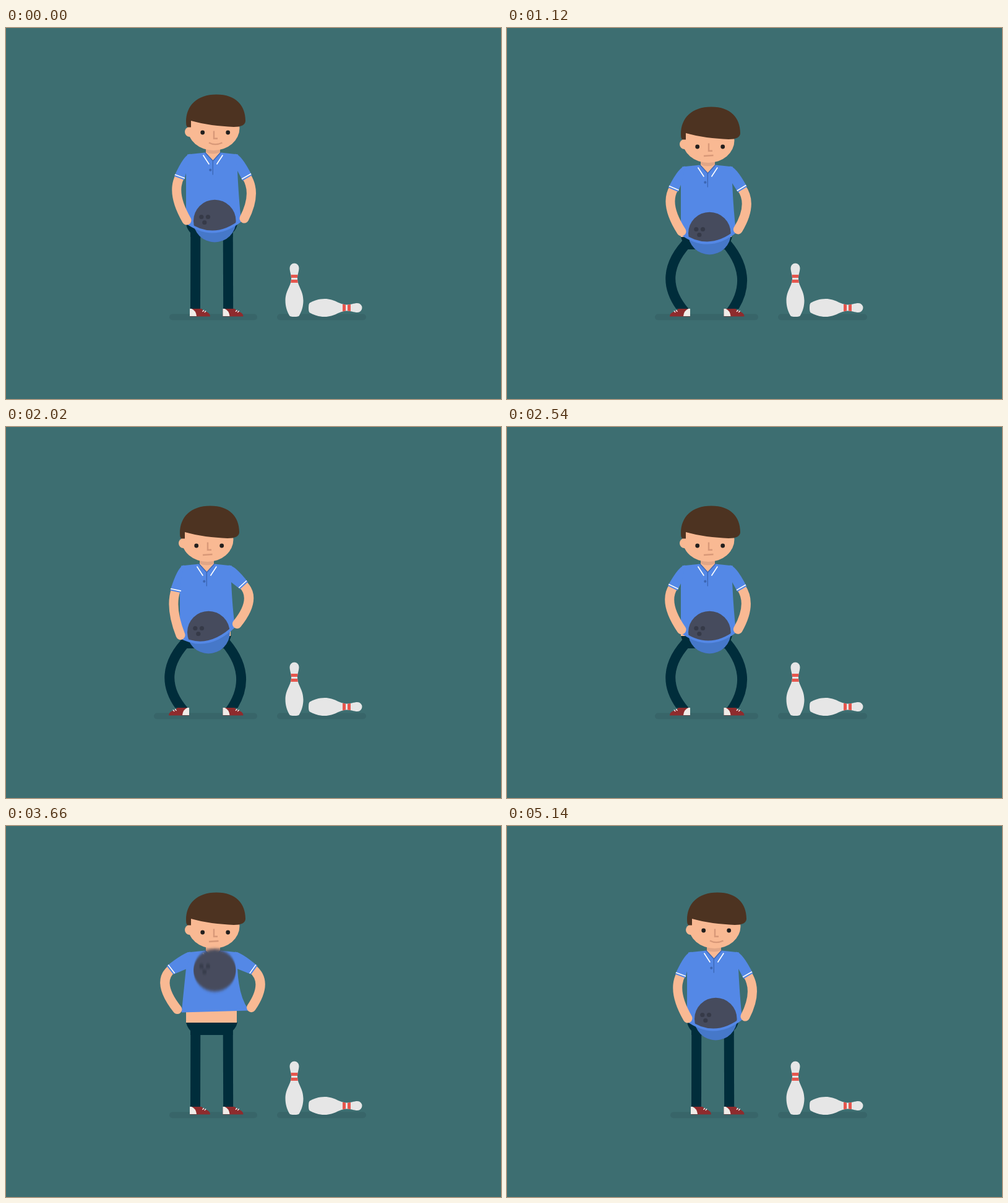
An HTML page for the animation above (6.2 s loop, 800 by 600 pixels).

```html
<!DOCTYPE html>
<html lang="en">
<head>
<meta charset="utf-8">
<title>Bowler</title>
<style>
  html, body { margin: 0; width: 100%; height: 100%; overflow: hidden; background: #3d6e71; }
  svg { display: block; width: 800px; height: 600px; }
  .skin { fill: #f9b993; }
  .shirt { fill: #5488e6; }
  .pants { fill: #002d3b; }
  .leg { fill: none; stroke: #002d3b; stroke-width: 16; }
  .arm { fill: none; stroke: #f9b993; stroke-width: 15; stroke-linecap: round; }
  .feature { fill: none; stroke: #d89878; stroke-width: 2.4; }
  .white { fill: none; stroke: #fff; stroke-width: 1.6; }
  .seam { fill: none; stroke: #3c66b4; stroke-width: 1.3; }
  .shadow { fill: #386569; }
</style>
</head>
<body>
<svg viewBox="0 0 800 600">
  <defs>
    <path id="pinShape" d="M458 465C454 458 451.5 450 451.5 441C451.5 424 461 418 461 405C461 398 458.5 394 458.5 388A7.5 7.5 0 0 1 473.5 388C473.5 394 471 398 471 405C471 418 480.5 424 480.5 441C480.5 450 478 458 474 465Q473 467 466 467Q459 467 458 465Z"/>
    <clipPath id="pinClip"><use href="#pinShape"/></clipPath>
    <g id="pin">
      <use href="#pinShape" fill="#e6e6e6"/>
      <path d="M450 399h32v5h-32zM450 407h32v5h-32z" fill="#e6564d" clip-path="url(#pinClip)"/>
    </g>
    <g id="shoe">
      <path d="M0 0H19C23 5 33 5 33 12.5H0Z" fill="#8e2b2d"/>
      <path d="M0 0H3Q10 3 11 12H0Z" fill="#f0ece8"/>
      <path d="M20.5 4.8l2.4-2.6M23.8 6l2.3-2.6" stroke="#fff" stroke-width="1.3"/>
    </g>
    <clipPath id="legClip"><rect x="200" y="300" width="250" height="154.5"/></clipPath>
    <clipPath id="pouchClip"><path id="pouchArea"/></clipPath>
    <filter id="blur" x="-20%" y="-30%" width="140%" height="160%"><feGaussianBlur id="blurAmount" stdDeviation="0 0"/></filter>
  </defs>

  <rect class="shadow" id="floor" y="462.5" height="10" rx="5"/>
  <rect class="shadow" x="438" y="462.5" width="144" height="10" rx="5"/>
  <use href="#pin"/>
  <use href="#pin" transform="translate(489 452.5) rotate(90) translate(-466 -467)"/>

  <g clip-path="url(#legClip)">
    <path class="leg" id="legL"/>
    <path class="leg" id="legR"/>
  </g>
  <use href="#shoe" id="shoeL"/>
  <use href="#shoe" transform="translate(350.5 454)"/>

  <g id="body">
    <path class="pants" d="M291 317.5H374Q372 326 366.5 331V338H298V331Q293 326 291 317.5Z"/>
    <rect class="skin" x="291" y="290" width="82" height="28"/>
    <path class="shirt" id="torso"/>
    <path class="skin" d="M323 188H346V202L334.5 214.5L323 202Z"/>
    <path d="M323 188H346V201Q334 206 323 201Z" fill="#e2a686"/>
    <path class="seam" d="M321.5 201L334.5 215L347 201M334.3 214V237.5"/>
    <circle cx="330.3" cy="229.7" r="2.1" fill="#3c66b4"/>
    <path class="white" d="M318.5 205.5L328.3 220.5M350.3 205.5L340.5 220.5"/>

    <circle class="skin" cx="297" cy="168" r="8"/>
    <ellipse class="skin" cx="335.5" cy="162" rx="42" ry="36"/>
    <g id="eyes" fill="#221f1e">
      <circle cx="317.7" r="3.4"/>
      <circle cx="358.7" r="3.4"/>
    </g>
    <path class="feature" d="M336 166.5V178.7H342"/>
    <path class="feature" id="mouth"/>
    <path d="M294 160.5Q291 160.5 291 152C291 125 309 107.5 340 107.5C372 107.5 387 126 387 150Q387 160 368 160C345 159 320 156 299 150V160.5Z" fill="#4d3321"/>

    <g id="ball">
      <circle r="34.3" fill="#464b5d"/>
      <g fill="#363a48">
        <circle cx="-21.5" cy="-6.5" r="3.6"/>
        <circle cx="-10.8" cy="-6.5" r="3.6"/>
        <circle cx="-16.5" cy="2.5" r="3.6"/>
      </g>
    </g>
    <g clip-path="url(#pouchClip)"><circle id="pouch" cx="337.3" r="34.5" fill="#4678c9"/></g>
    <path id="rim" fill="none" stroke="#5488e6" stroke-width="4"/>

    <path class="arm" id="armL"/>
    <path class="shirt" id="sleeveL"/>
    <path class="white" id="cuffL"/>
    <path class="arm" id="armR"/>
    <path class="shirt" id="sleeveR"/>
    <path class="white" id="cuffR"/>
  </g>
</svg>
<script>
const LOOP = 6200;
const $ = id => document.getElementById(id);
const set = (id, name, value) => $(id).setAttribute(name, value);

// Eased 0 to 1 between two times; pulse goes up and comes back down.
function ramp(t, from, to) {
  const u = Math.min(1, Math.max(0, (t - from) / (to - from)));
  return (1 - Math.cos(Math.PI * u)) / 2;
}
const pulse = (t, a, b, c, d) => ramp(t, a, b) - ramp(t, c, d);

// Eased lift-off, free flight, then a damped landing.
function ballHeight(t) {
  const rest = 312, top = 111, landed = t - 4520;
  if (t < 3600) return rest - 37 * Math.max(0, (t - 3400) / 200) ** 4;
  if (landed < 0) return top + 0.000834 * (t - 4044) ** 2;
  return rest + (0.447 * landed - 12) * Math.exp(-landed / 35);
}

// Rocking of the hands while crouched; positive raises the left one.
function rocking(t) {
  return t > 760 && t < 2560 ? 7.5 * Math.cos(2 * Math.PI * (t - 940) / 720) : 0;
}

// Raising a hand by `lift` swings elbow and sleeve outwards; returns the hand.
function drawArm(side, lift, spread) {
  const left = side === 'L', out = left ? -1 : 1, reach = left ? -1.05 : 0.8;
  const cx = (left ? 281 : 388.5) + reach * (0.6 * lift + 0.3 * spread);
  const cy = 240 - 0.6 * lift;
  const kx = (left ? 266.5 : 406) + reach * (1.4 * lift + 0.2 * spread);
  const ky = 267 - lift;
  const hx = (left ? 292 : 385) + reach * spread;
  const hy = (left ? 311 : 308) - lift;

  const dx = cx - (left ? 291 : 373), dy = cy - 213, len = Math.hypot(dx, dy);
  const ux = dx / len, uy = dy / len;
  const at = (across, along) =>
    `${cx + out * uy * across + ux * along} ${cy - out * ux * across + uy * along}`;
  const shoulder = left ? 298 : 370;
  set('arm' + side, 'd', `M${cx} ${cy}Q${kx} ${ky} ${hx} ${hy}`);
  set('sleeve' + side, 'd',
    `M${shoulder} 203.5Q${shoulder + out * 10} 204 ${at(8.6, 3)}L${at(-8.6, 3)}L${shoulder - out * -5} 231Z`
      .replace(`L${shoulder - out * -5} 231`, `L${left ? 292 : 374} 231`));
  set('cuff' + side, 'd', `M${at(8.6, 0)}L${at(-8.6, 0)}`);
  return [hx, hy];
}

function drawLeg(id, hx, hy, ax, bow) {
  const ay = 460, third = (a, b) => (2 * a + b) / 3;
  set(id, 'd', `M${hx} ${hy}C${third(hx, ax) + bow} ${third(hy, ay)} ` +
    `${third(ax, hx) + bow} ${third(ay, hy)} ${ax} ${ay}`);
}

function drawLegs(t, squat) {
  const dx = -10 * squat, hipY = 322 + 20 * squat;
  const ankle = 306 - 19 * pulse(t, 20, 260, 2880, 3110);
  const turn = 1 - 2 * pulse(t, 140, 300, 2720, 2860);
  const floor = 264 - 25 * pulse(t, 20, 420, 2700, 3110);
  drawLeg('legL', 306.3 + dx, hipY, ankle + squat, -37 * squat);
  drawLeg('legR', 358.7 + dx, hipY, 359.2 + 2 * squat, 33 * squat);
  set('shoeL', 'transform', `translate(${ankle - 9 * turn} 454) scale(${turn} 1)`);
  set('floor', 'x', floor);
  set('floor', 'width', 406 - floor);
}

function drawFace(t) {
  const frown = pulse(t, 40, 420, 4420, 5000);
  set('mouth', 'd', `M328 ${185.5 + 1.5 * frown}Q${338 - 2 * frown} ${190.8 - 4.3 * frown} ` +
    `${349.5 - 6 * frown} ${185.5 + 0.5 * frown}`);
  set('eyes', 'transform', `translate(0 ${169 + 3 * pulse(t, 40, 420, 3660, 4800)})`);
}

function drawShirtAndBall(t) {
  const hold = 2 * pulse(t, 260, 700, 2560, 2720);
  const toss = 7.5 * pulse(t, 3400, 3630, 4470, 4640) + 7 * pulse(t, 3400, 3630, 3630, 4010);
  const rock = rocking(t);
  const [leftX, leftY] = drawArm('L', hold + toss + rock, toss);
  const [rightX, rightY] = drawArm('R', hold + toss - rock, toss - hold);

  const lx = Math.min(leftX + 7, 291), ly = leftY + 3;
  const rx = Math.max(rightX - 5, 380), ry = rightY + 3;
  const dip = 34 * (1 - pulse(t, 3440, 3600, 4465, 4560));
  const hem = `${lx} ${ly}Q${(lx + rx) / 2} ${(ly + ry) / 2 + dip} ${rx} ${ry}`;
  set('torso', 'd', `M322 201.5L293 204.5L291 230L${hem}Q376 275 374 230L375 204.5L347 201.5L334.5 215Z`);
  set('pouchArea', 'd', `M${hem}L430 420H240Z`);
  set('rim', 'd', `M${hem}`);

  const y = ballHeight(t);
  const speed = Math.abs(ballHeight(t + 5) - ballHeight(t - 5)) / 10;
  set('ball', 'transform', `translate(337.3 ${y})`);
  set('pouch', 'cy', y);
  set('blurAmount', 'stdDeviation', `0 ${speed * 4}`);
  set('ball', 'filter', speed > 0.05 ? 'url(#blur)' : 'none');
}

function draw(t) {
  const squat = pulse(t, 240, 690, 2580, 2880);
  set('body', 'transform', `translate(${-10 * squat} ${20 * squat})`);
  drawLegs(t, squat);
  drawFace(t);
  drawShirtAndBall(t);
}

const start = performance.now();
function frame() {
  draw((performance.now() - start) % LOOP);
  requestAnimationFrame(frame);
}
frame();
</script>
</body>
</html>
```
